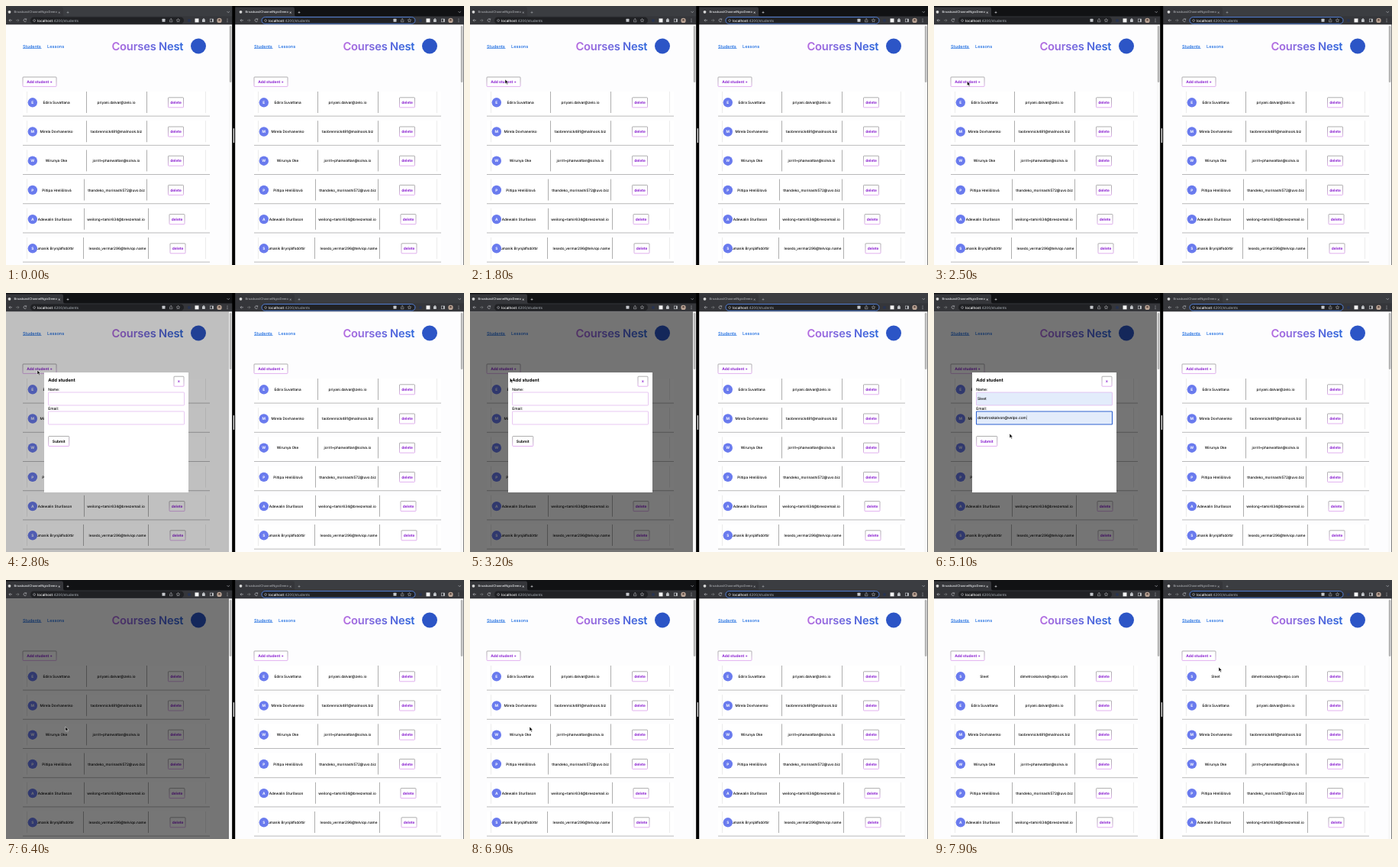
An HTML page that plays this animation: 600 by 339 pixels, repeating every 8000 ms.

```html
<!DOCTYPE html>
<html lang="en">
<head>
<meta charset="utf-8">
<title>Student list in two windows</title>
<style>
  html, body { margin: 0; height: 100%; overflow: hidden; background: #000; }
  svg { display: block; width: 100vw; height: 100vh; font-family: Inter, "Open Sans", sans-serif; font-weight: 500; text-rendering: geometricPrecision; }
  .card { filter: drop-shadow(0 1.2px .6px #0004); }
  .mid { text-anchor: middle; }
  .bold { font-weight: 700; }
  .title { font-weight: 600; }
</style>
</head>
<body>
<svg id="stage" viewBox="0 0 600 339"></svg>
<script>
const LOOP = 8000, PITCH = 38.2, PURPLE = '#8a1fd0';

// name, email, first divider, second divider, name centre, email centre, button centre
const students = [
  ['Sleet', 'dimetroskalvon@velpo.com', 105.5, 184.5, 66, 144, 222.5],
  ['Edira Suvattana', 'priyani.dalvar@zelo.io', 105.5, 184.5, 66, 144.5, 222.5],
  ['Mirela Dovhanenko', 'taobrennick481@mailnook.biz', 105.5, 184.5, 66, 144.5, 222.5],
  ['Wirunya Oke', 'jorrit+phanwattan@solva.io', 105.5, 184.5, 66, 144.5, 222.5],
  ['Piltipa Hrelišilová', 'thandeko_morinashi572@uvo.biz', 102.5, 184.5, 66.5, 144.5, 222.5],
  ['Adewalin Sturðason', 'weilong+tamir634@breezemail.io', 102.5, 186.5, 64, 144, 224],
  ['Sumanik Brynjálfsdóttir', 'lesedo_vermar296@telviqo.name', 101.5, 186.5, 63, 146, 225]
];
const [newName, newEmail] = students[0];

// Text is placed by its left or middle x and its vertical centre
const text = (x, y, size, str, attrs = '') =>
  `<text x="${x}" y="${y + size * .36}" font-size="${size}" ${attrs}>${str}</text>`;
const rect = (x, y, w, h, attrs = '') => `<rect x="${x}" y="${y}" width="${w}" height="${h}" ${attrs}/>`;
const dot = (x, y, r, fill) => `<circle cx="${x}" cy="${y}" r="${r}" fill="${fill}"/>`;
const line = (d, color, width = .6) => `<path d="${d}" fill="none" stroke="${color}" stroke-width="${width}"/>`;
const button = (cx, cy, w, h, label, attrs = `fill="${PURPLE}"`) =>
  rect(cx - w / 2, cy - h / 2, w, h, 'rx=".8" fill="#fff" stroke="url(#edge)" stroke-width=".6"') +
  text(cx, cy, 4.85, label, `class="mid bold" ${attrs}`);

function row([name, email, div1, div2, nameX, emailX, buttonX], i) {
  const y = 112 + i * PITCH, mid = y + 14.3;
  return `<g class="row${i}">` +
    rect(22, y, 245, 31.6, 'class="card" fill="#fff"') +
    line(`M27.5 ${y}v28M261.5 ${y}v28`, '#ddd') +
    line(`M${div1} ${y}v28M${div2} ${y}v28`, '#777') +
    text(nameX, mid, 4.7, name, 'class="mid"') +
    dot(34.8, mid, 6.2, '#6a7bee') +
    text(34.8, mid, 4.8, name[0], 'class="mid bold" fill="#fff"') +
    text(emailX, mid, 4.7, email, 'class="mid"') +
    button(buttonX, mid, 20, 13, 'delete') + '</g>';
}

function chrome(id, ring) {
  const icon = '#c4c7cb';
  return rect(-3, 0, 300, 14, `id="strip${id}"`) +
    `<path d="M-3 14V1.5H73q2 0 2 3V11q0 3 3 3z" fill="#35363a"/>` +
    rect(-3, 13.5, 300, 10.8, 'fill="#35363a"') +
    `<g id="tab${id}" fill="#e8eaed">` +
    dot(4.5, 7.8, 1.9, '#d8d8d8') +
    text(10.5, 7.8, 4.05, 'BroadcastChannelNgrxDemo') + text(68, 7.8, 5, '×') + text(79, 7.6, 6, '+') + '</g>' +
    line('M289.5 7l1.7 1.7 1.7-1.7', icon) +
    line('M8 18.8H4m1.7-1.7L4 18.8l1.7 1.7', icon) +
    line('M13 18.8h4m-1.7-1.7 1.7 1.7-1.7 1.7', '#85878a') +
    line('M26.5 17.6a1.9 1.9 0 1 0 .2 1.8M26.7 16.4v1.5h-1.5', icon) +
    rect(32, 14.6, 201, 8.6, `rx="4.3" fill="#202124" ${ring ? 'stroke="#5b8def" stroke-width=".9"' : ''}`) +
    line('M37.1 17.5a1.5 1.5 0 1 0 .1 0M37.1 18.7v1.2', icon, .5) +
    text(41, 18.9, 4.6, '<tspan fill="#fff">localhost</tspan>:4200/students', 'fill="#9aa0a6"') +
    rect(204.5, 16.7, 4, 4, 'rx=".5" fill="#c4c7cb"') +
    line('M214.5 18.2v2.6h3.4v-2.6M216.2 19.5v-3m-1.2 1.1 1.2-1.2 1.2 1.2', icon, .5) +
    line('M225.5 16.5l.7 1.5 1.6.2-1.2 1.1.3 1.6-1.4-.8-1.4.8.3-1.6-1.2-1.1 1.6-.2z', icon, .5) +
    dot(240, 18.9, 2, '#273351') +
    rect(247.5, 16.4, 5, 5, 'fill="#f4f4f4"') +
    rect(257, 17.2, 3.8, 3.8, 'rx=".6" fill="#c4c7cb"') + dot(259, 16.9, .8, icon) +
    rect(267.5, 17, 4, 3.8, 'fill="none" stroke="#c4c7cb" stroke-width=".6"') +
    rect(270, 17, 1.5, 3.8, 'fill="#c4c7cb"') +
    dot(279.5, 18.9, 3.2, '#b9a394') + dot(279.5, 18.2, 1.2, '#5c4840') +
    [17, 18.9, 20.8].map(y => dot(290, y, .5, icon)).join('');
}

const browser = (id, x, ring) => `<g transform="translate(${x})">` +
  rect(-3, 24, 299.3, 315, 'fill="#fdfdfe"') +
  `<g fill="#1769e0">${text(22, 52.5, 5.6, 'Students')}${text(54, 52.5, 5.6, 'Lessons')}</g>` +
  line('M22 55.5h24.5', '#1769e0') +
  text(138.5, 52.7, 14.7, 'Courses Nest', 'class="title" letter-spacing="-.2" fill="url(#brand)"') +
  dot(252, 52.5, 10, '#2c55c6') +
  button(44, 99.2, 44, 12.4, 'Add student +') +
  `<g class="list">${students.map(row).join('')}</g>` +
  rect(292, 24, 4.3, 315, 'fill="#f8f8f8"') + rect(292.8, 26, 2.6, 74, 'rx="1.3" fill="#b5b5b5"') +
  chrome(id, ring) + '</g>';

const field = (id, y, value) =>
  rect(55.5, y, 178, 17, `id="${id}Box" rx=".6"`) +
  text(57, y + 8.6, 4.8, `${value}<tspan id="${id}Caret" font-weight="300">|</tspan>`, `id="${id}Text"`);

const menu = (id, x, y, w, items) => `<g id="${id}">` +
  `<path d="M${x + 4} ${y}l3-3 3 3z" fill="#292a2d"/>` +
  rect(x, y, w, items.length * 11.3 + 2.5, 'rx="1.5" fill="#25262a"') +
  rect(x, y + 1.2, w, 11.3, 'fill="#3d3e42"') +
  items.map((s, i) => text(x + 4, y + 7 + i * 11.3, 4.1, s, 'fill="#eee"')).join('') + '</g>';

const modal = '<g id="modal">' +
  rect(50, 104, 189, 157, 'fill="#fff"') +
  text(55.3, 113.6, 5.9, 'Add student', 'class="bold"') +
  button(226.5, 115.7, 13, 13, 'x') +
  text(55.3, 126, 4.9, 'Name:') + field('name', 130, newName) +
  text(55.3, 151.2, 4.9, 'Email:') + field('email', 155, newEmail) +
  button(69.2, 194, 27, 13, 'Submit', 'id="submit"') +
  menu('nameMenu', 86, 150, 57, [newName, 'Ned', 'secure mail 2 delete me', 'a', 'dev']) +
  menu('emailMenu', 86, 175.5, 68, [newEmail]) + '</g>';

stage.innerHTML = `<defs>
  <linearGradient id="edge" x2="0" y2="1"><stop stop-color="#777"/><stop offset=".4" stop-color="#8d7a94"/><stop offset="1" stop-color="#cf7ce6"/></linearGradient>
  <linearGradient id="brand" gradientUnits="userSpaceOnUse" x1="139" x2="231"><stop stop-color="#b56be0"/><stop offset="1" stop-color="#2f66dc"/></linearGradient>
  </defs>` +
  browser('L', 0, false) +
  rect(0, 24.3, 292, 315, 'id="shade"') + modal +
  browser('R', 303, true) +
  rect(296.3, 0, 3.9, 339) + rect(297.7, 160, 1.3, 19, 'rx=".6" fill="#eee"') +
  '<path id="cursor" d="M0 0v5.8l1.4-1.2 1 2.1 1-.5-1-2h1.8z" stroke="#fff" stroke-width=".5"/>';

const $ = id => document.getElementById(id);
const set = (id, attr, value) => $(id).setAttribute(attr, value);
const show = (id, on) => $(id).style.display = on ? '' : 'none';
const ramp = (t, a, b) => Math.min(1, Math.max(0, (t - a) / (b - a)));
const within = (t, a, b) => t >= a && t < b;

// time, x, y
const path = [
  [900, 150, 200], [1700, 46, 96], [2300, 46, 96], [2700, 41, 101], [3100, 41, 101],
  [3400, 84, 140], [3700, 84, 140], [4000, 87, 159], [4300, 87, 159], [4550, 98, 165],
  [4700, 98, 165], [4900, 99, 184], [5200, 99, 184], [5900, 76, 193], [6500, 78, 192],
  [6950, 78, 192], [7800, 373, 114], [LOOP, 373, 114]
];

function moveCursor(t) {
  show('cursor', t >= path[0][0]);
  const i = Math.max(1, path.findIndex(p => p[0] > t));
  const [t0, x0, y0] = path[i - 1], [t1, x1, y1] = path[i];
  const k = ramp(t, t0, t1), e = k * k * (3 - 2 * k);
  set('cursor', 'transform', `translate(${x0 + (x1 - x0) * e} ${y0 + (y1 - y0) * e})`);
}

function drawField(id, filled, focused) {
  set(id + 'Box', 'fill', filled ? '#e3ecfb' : '#fff');
  set(id + 'Box', 'stroke', focused ? '#2f62d0' : '#d9a3ea');
  set(id + 'Box', 'stroke-width', focused ? 1.1 : .6);
  show(id + 'Text', filled);
}

function draw(t) {
  const leftActive = t >= 2300, added = t >= 7250;
  for (const [id, active] of [['L', leftActive], ['R', !leftActive]]) {
    set('strip' + id, 'fill', active ? '#111214' : '#3b3d41');
    set('tab' + id, 'fill', active ? '#e8eaed' : '#a5a8ac');
  }
  set('shade', 'opacity', .54 * (ramp(t, 2710, 2910) - ramp(t, 6400, 6600)));
  show('modal', within(t, 2750, 6400));

  drawField('name', t >= 3950, within(t, 3450, 4600));
  drawField('email', t >= 4850, t >= 4600);
  show('nameCaret', false);
  show('emailCaret', t >= 4950);
  show('nameMenu', within(t, 3550, 4300));
  show('emailMenu', within(t, 4700, 4950));
  set('submit', 'fill', t >= 4950 ? PURPLE : '#111');

  document.querySelectorAll('.list').forEach(g => g.setAttribute('transform', `translate(0 ${added ? 0 : -PITCH})`));
  document.querySelectorAll('.row0').forEach(g => g.style.display = added ? '' : 'none');
  moveCursor(t);
}

const start = performance.now();
(function frame() {
  draw((performance.now() - start) % LOOP);
  requestAnimationFrame(frame);
})();
</script>
</body>
</html>
```
